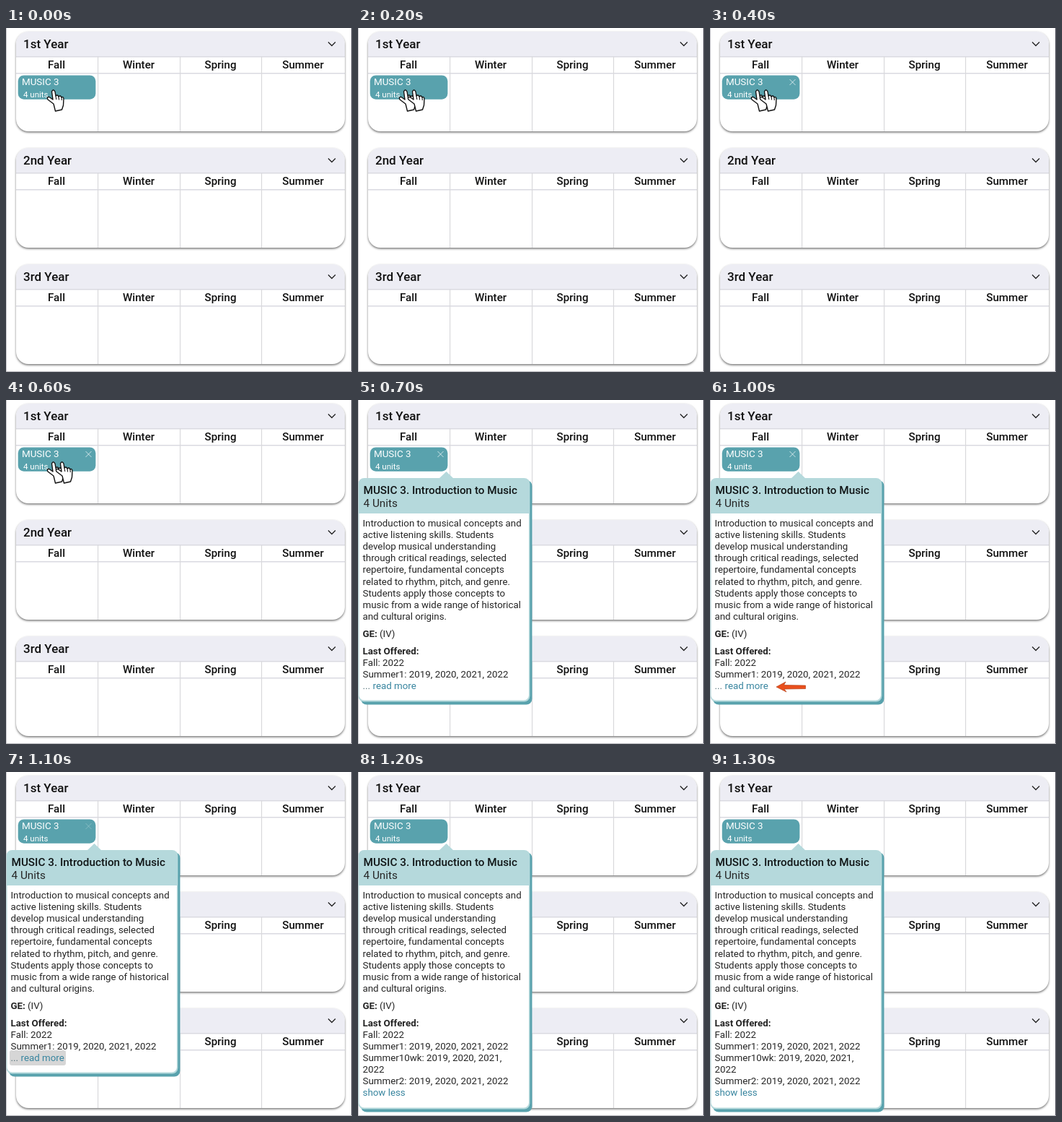
These frames come from a looping animation (480x476 px, 1400 ms). An HTML page with a canvas:

```html
<!DOCTYPE html>
<html lang="en">
<head>
<meta charset="utf-8">
<title>Course planner</title>
<style>
  html, body { margin: 0; width: 100%; height: 100%; overflow: hidden; background: #fff; }
  canvas { display: block; width: 480px; height: 476px; }
</style>
</head>
<body>
<canvas id="stage"></canvas>
<script>
const W = 480, H = 476, LOOP = 1400;
const TEAL = '#59a2ad', PALE = '#b5d9dc', LINK = '#38859f', INK = '#262626';
const canvas = document.getElementById('stage');
const ctx = canvas.getContext('2d');
const dpr = window.devicePixelRatio || 1;
canvas.width = W * dpr;
canvas.height = H * dpr;
ctx.scale(dpr, dpr);

const DIVIDERS = [127, 241, 354];
const TERMS = ['Fall', 'Winter', 'Spring', 'Summer'];
const TERM_X = [70, 184, 297.5, 412];
const DESCRIPTION = [
  'Introduction to musical concepts and',
  'active listening skills. Students',
  'develop musical understanding',
  'through critical readings, selected',
  'repertoire, fundamental concepts',
  'related to rhythm, pitch, and genre.',
  'Students apply those concepts to',
  'music from a wide range of historical',
  'and cultural origins.'
];
const OFFERED = ['Fall: 2022', 'Summer1: 2019, 2020, 2021, 2022'];
const OFFERED_MORE = ['Summer10wk: 2019, 2020, 2021,', '2022', 'Summer2: 2019, 2020, 2021, 2022'];
const LEADING = 16.1, BODY = 13.33;

function text(str, x, y, size, color = INK, weight = 400, align = 'left') {
  ctx.font = `${weight} ${size}px Roboto, sans-serif`;
  ctx.textAlign = align;
  ctx.fillStyle = color;
  ctx.fillText(str, x, y);
}

function rect(x, y, w, h, color) {
  ctx.fillStyle = color;
  ctx.fillRect(x, y, w, h);
}

function roundRect(x, y, w, h, r, color) {
  ctx.beginPath();
  ctx.roundRect(x, y, w, h, r);
  ctx.fillStyle = color;
  ctx.fill();
}

function polygon(points, color) {
  ctx.beginPath();
  points.forEach(([x, y]) => ctx.lineTo(x, y));
  ctx.closePath();
  ctx.fillStyle = color;
  ctx.fill();
}

function stroke(points, color, width) {
  ctx.beginPath();
  points.forEach(([x, y]) => ctx.lineTo(x, y));
  ctx.strokeStyle = color;
  ctx.lineWidth = width;
  ctx.stroke();
}

function yearCard(title, dy) {
  ctx.save();
  ctx.translate(0, dy);
  ctx.save();
  ctx.shadowColor = 'rgba(0,0,0,.55)';
  ctx.shadowBlur = 3 * dpr;
  ctx.shadowOffsetY = 1.5 * dpr;
  roundRect(14, 5, 456, 138, 17, '#fff');
  ctx.restore();
  roundRect(14, 5, 456, 34, [17, 17, 0, 0], '#ededf4');
  rect(14, 39, 456, 1.5, '#dadae1');
  rect(14, 62, 456, 1.5, '#dadae1');
  DIVIDERS.forEach(x => rect(x, 40, 1.2, 103, '#d9d9dc'));
  text(title, 24, 28, 17, '#111', 500);
  TERMS.forEach((term, i) => text(term, TERM_X[i], 56, 15.2, '#111', 500, 'center'));
  stroke([[447, 19.5], [452, 24.5], [457, 19.5]], '#222', 1.3);
  ctx.restore();
}

function courseBlock(closeAlpha) {
  roundRect(16.7, 65.5, 107.7, 33.2, 8, TEAL);
  text('MUSIC 3', 22, 78.5, 13.4, '#fff');
  text('4 units', 24, 95.7, 11.5, '#fff');
  if (!closeAlpha) return;
  const color = `rgba(255,255,255,${closeAlpha})`;
  stroke([[110.5, 71], [118.5, 79]], color, 1);
  stroke([[118.5, 71], [110.5, 79]], color, 1);
}

function hand(dx) {
  ctx.save();
  ctx.translate(dx, 0);
  ctx.lineJoin = 'round';
  ctx.beginPath();
  ctx.moveTo(66, 105);
  ctx.lineTo(58, 99);
  ctx.quadraticCurveTo(56, 95, 60, 95.5);
  ctx.lineTo(65, 99);
  ctx.lineTo(63.5, 88);
  ctx.quadraticCurveTo(65.5, 83.5, 68, 88);
  ctx.lineTo(69, 94);
  ctx.quadraticCurveTo(71.5, 91.5, 73, 95);
  ctx.quadraticCurveTo(75.5, 92.5, 77, 96);
  ctx.quadraticCurveTo(79.5, 94.5, 80, 98);
  ctx.lineTo(79.5, 107);
  ctx.lineTo(77.5, 113);
  ctx.lineTo(68.5, 115);
  ctx.closePath();
  ctx.fillStyle = '#fff';
  ctx.fill();
  ctx.strokeStyle = '#111';
  ctx.lineWidth = 1.4;
  ctx.stroke();
  stroke([[69, 94], [69.8, 99]], '#111', 1.1);
  stroke([[73, 95], [73.6, 99.5]], '#111', 1.1);
  stroke([[77, 96], [77.3, 100]], '#111', 1.1);
  ctx.restore();
}

function arrow() {
  const outline = [[92, 397], [105, 390], [102.5, 394.5], [132.5, 395],
    [132.5, 399.5], [103, 400], [106, 404]];
  polygon(outline, '#ea4f1c');
  stroke([...outline, outline[0]], '#b5441c', 0.7);
}

function popup(expanded, pressed) {
  const bottom = expanded ? 466 : 417;
  roundRect(4, 111, 237.5, bottom - 106.5, 8, TEAL);
  roundRect(0.5, 108, 238, bottom - 107.5, 8, PALE);
  roundRect(1.5, 157, 235.5, bottom - 158.5, [0, 0, 7, 7], '#fff');
  polygon([[112, 109], [122.5, 99], [133, 109]], PALE);

  text('MUSIC 3. Introduction to Music', 7.5, 130, 15.3, '#111617', 500);
  text('4 Units', 7.5, 148, 15.3);

  const body = (str, y, weight) => text(str, 6.5, y, BODY, INK, weight);
  DESCRIPTION.forEach((line, i) => body(line, 175 + i * LEADING));
  body('GE:', 328, 700);
  text('(IV)', 30, 328, BODY);
  body('Last Offered:', 351.5, 700);

  const lines = expanded ? OFFERED.concat(OFFERED_MORE) : OFFERED;
  lines.forEach((line, i) => body(line, 367.7 + i * LEADING));
  const linkY = 367.7 + lines.length * LEADING;
  if (expanded) {
    text('show less', 6.5, linkY, BODY, LINK);
    return;
  }
  if (pressed) roundRect(5, 385, 78, 21, 3, '#d6d6d6');
  text('...', 6.5, linkY, BODY, '#4f6d74');
  text('read more', 20.5, linkY, BODY, LINK);
}

function closeAlpha(t) {
  if (t < 300 || t >= 1200) return 0;
  return t < 400 || t >= 1100 ? 0.25 : 0.7;
}

function draw(t) {
  rect(0, 0, W, H, '#fff');
  rect(0, 0, 1, H, '#c9c9ce');
  rect(479, 0, 1, H, '#50505c');
  rect(0, 475, W, 1, '#b5b5ba');
  yearCard('1st Year', 0);
  yearCard('2nd Year', 161);
  yearCard('3rd Year', 322);
  courseBlock(closeAlpha(t));
  if (t < 700) {
    hand(0);
    if (t >= 100) hand(12);
    return;
  }
  popup(t >= 1200, t >= 1100);
  if (t >= 800 && t < 1100) arrow();
}

const start = performance.now();
function tick() {
  draw((performance.now() - start) % LOOP);
  requestAnimationFrame(tick);
}
tick();
</script>
</body>
</html>
```
